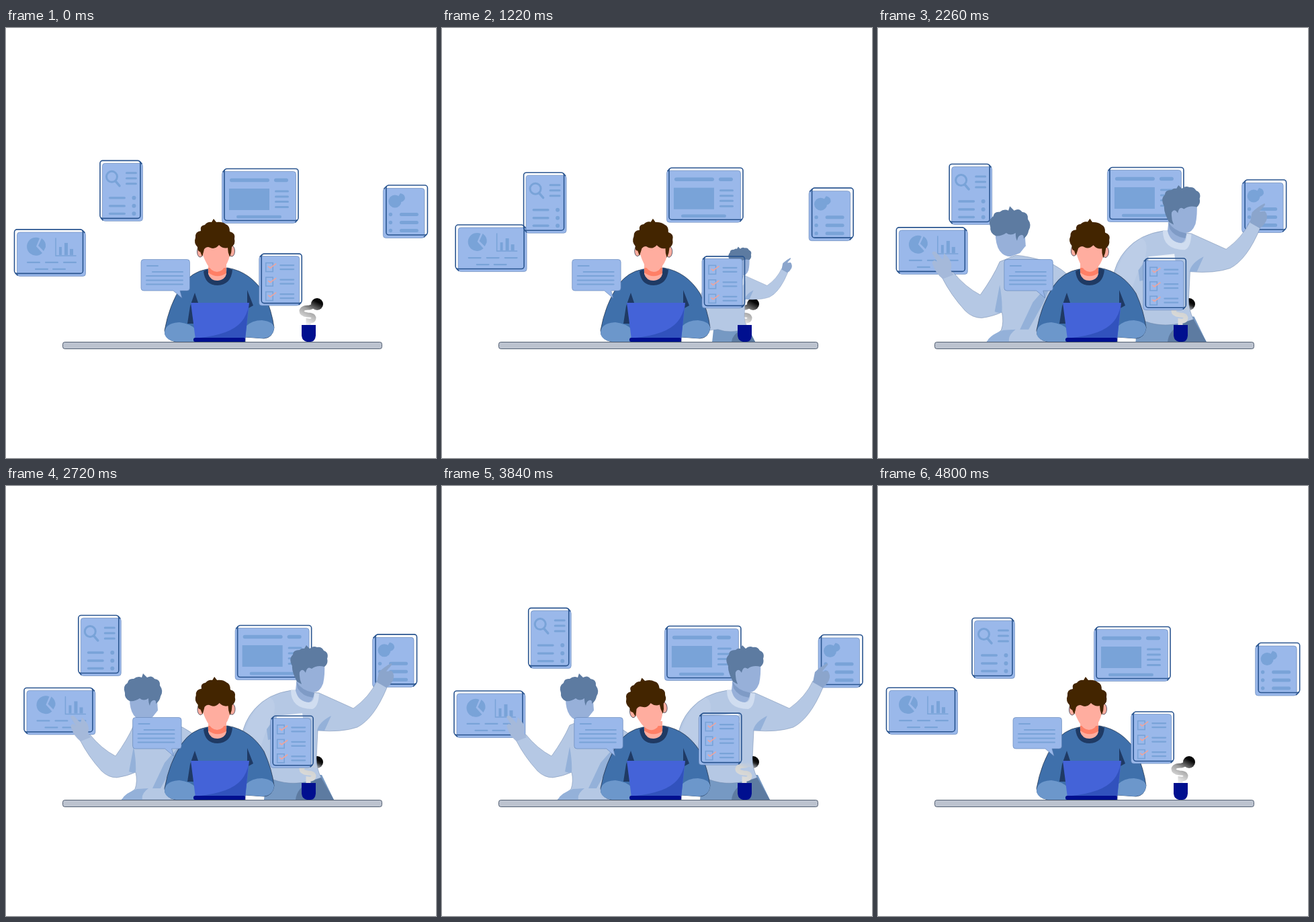
Recreate the animation shown at these times as an HTML page. Size 640 by 640 pixels, loop 4840 ms.

```html
<!DOCTYPE html>
<html lang="en">
<head>
<meta charset="utf-8">
<title>Multitasking at the desk</title>
<style>
  html, body { margin: 0; height: 100%; overflow: hidden; background: #fff; }
  svg { display: block; width: 100vw; height: 100vh; }
  .fill { fill: #9ab8ea; stroke: #5f80b3; stroke-width: .6; }
  .frame { fill: none; stroke: #2a5590; stroke-width: 1.6; }
  .ink { fill: #79a3d8; }
  .line { fill: none; stroke: #79a3d8; stroke-linecap: round; }
  .edge { stroke: #1c2c44; stroke-width: .7; }
  .tick { fill: none; stroke: #eda59f; stroke-width: 1.7; }
  .g-body { fill: #b5c8e4; stroke: #6f86aa; stroke-width: .5; }
  .g-hair { fill: #5d7ba1; }
  .g-skin { fill: #97b0d9; }
  .g-fold { fill: #94b1d9; }
</style>
</head>
<body>
<svg viewBox="0 0 640 640">
  <defs>
    <linearGradient id="dark" gradientUnits="userSpaceOnUse" x1="449" y1="441" x2="466" y2="409">
      <stop offset="0" stop-color="#eee"/><stop offset=".55" stop-color="#a0a0a0"/><stop offset="1" stop-color="#080808"/>
    </linearGradient>
    <linearGradient id="pale" gradientUnits="userSpaceOnUse" x1="449" y1="441" x2="462" y2="411">
      <stop offset="0" stop-color="#dededc"/><stop offset=".6" stop-color="#d2d3d2"/><stop offset="1" stop-color="#b5c8e4" stop-opacity="0"/>
    </linearGradient>
    <g id="steam">
      <path d="M450 443V436Q458 437 458 431Q457 427 449 427Q440 426 440 421Q441 416 452 416L460 413" fill="none" stroke-width="7"/>
      <circle cx="463" cy="411" r="9" stroke="none"/>
    </g>
  </defs>

  <g id="panels"></g>
  <use href="#steam" fill="url(#dark)" stroke="url(#dark)"/>

  <g id="leftGhost">
    <path class="g-body" d="M190 356Q181 377 163 402Q142 391 125 370L110 378Q122 402 142 424Q152 434 165 434Q180 432 193 426Q196 440 192 451L172 467H300V390Q276 362 252 355Q228 348 212 347Z"/>
    <path class="g-fold" d="M190 388L183 425Q189 428 193 426Q194 410 190 388ZM172 467Q177 457 195 451L212 450Q201 458 203 467ZM264 380L236 412L218 450H230L250 414Z"/>
    <path class="g-skin" d="M184 316Q184 332 190 341Q196 349 205 349L218 344L226 334L224 305H190Z"/>
    <path class="g-hair" d="M184 320Q176 316 177 308Q173 298 181 293Q182 286 190 287Q196 282 202 285L204 279L210 285Q217 281 221 287Q230 288 229 297Q235 305 230 313Q229 320 223 324Q224 318 219 319Q215 320 214 327Q212 323 212 316Q205 321 199 316Q192 321 184 320Z"/>
    <path fill="#a5b9da" d="M111 380Q101 372 98 362Q94 355 100 354L104 357L96 344Q98 340 102 343L111 353L113 344L119 351Q125 358 122 368L126 374Z"/>
  </g>

  <g id="rightGhost">
    <path fill="#7699c3" d="M388 430H470L488 467H384Z"/>
    <path class="g-hair" d="M468 432L488 467H431Q433 449 453 440Z"/>
    <path class="g-body" d="M425 304Q390 309 370 332Q354 350 350 376L372 440L398 437Q430 449 469 434Q462 420 462 405L464 364Q500 367 523 359Q548 346 567 300L552 290Q541 314 517 331L466 308Z"/>
    <path fill="#bccde7" d="M392 315Q364 332 354 370L374 410Q382 370 398 344Q404 318 392 315Z"/>
    <path class="g-fold" d="M484 342L474 364H463Q466 351 484 342ZM401 345L388 362L390 378L440 366L425 344Z"/>
    <path fill="#eef3fa" d="M403 342L441 338L443 352L402 357Z"/>
    <path fill="#d0ddf0" d="M424 304Q424 332 456 332Q465 329 466 309L459 308Q459 323 450 322Q433 320 431 303Z"/>
    <path class="g-skin" d="M431 304Q435 321 451 322Q458 320 458 307Q467 307 472 294Q475 281 474 263L435 266Z"/>
    <path fill="#7f9bc6" d="M432 291Q440 304 456 307L459 308L457 315Q441 313 434 301Z"/>
    <path class="g-hair" d="M433 291Q425 276 426 268Q420 257 427 251Q427 244 437 244Q440 241 444 242L447 237L452 242Q457 237 463 240Q470 239 473 245Q481 248 478 257Q480 264 474 269Q463 266 455 272Q448 267 446 278Q441 270 437 277Q436 286 440 295Z"/>
    <path fill="#8ba5cc" d="M552 292L555 277Q563 269 573 264Q577 264 569 272L566 276L574 275Q579 281 576 289Q572 297 566 300Z"/>
  </g>

  <g id="man">
    <path class="edge" fill="#3f70ab" d="M299 359Q276 363 262 383Q243 411 236 450Q236 464 253 467H356V460L384 462Q397 461 399 446Q396 422 384 395Q364 363 330 357Z"/>
    <path fill="#1f3a64" d="M281 394L274 414L270 440H282L286 409ZM359 390L368 413L359 418ZM294 362Q296 383 315 383Q335 382 337 360L329 357Q328 375 315 376Q302 375 300 359Z"/>
    <path fill="#ffad9f" d="M301 350V366Q304 376 315 376Q326 375 328 366V350Z"/>
    <path fill="#ff7f66" d="M301 357H328V365Q314 374 301 364Z"/>
    <path fill="#6c97cb" d="M236 453Q237 439 258 438Q275 440 283 449L281 467H253Q236 464 236 453ZM357 444Q366 435 381 435Q399 437 399 447Q397 462 380 462L355 460Z"/>
    <g id="head">
      <g fill="#ffad9f" class="edge">
        <ellipse cx="289" cy="333" rx="4.5" ry="8"/>
        <ellipse cx="336" cy="332" rx="4.5" ry="8"/>
      </g>
      <path fill="#ffad9f" d="M292 318L293 338Q299 354 306 360Q314 366 322 360Q331 350 333 338L335 318Z"/>
      <path fill="#432500" d="M292 340L289 333Q285 333 285 326Q279 320 282 312Q281 303 290 302Q288 294 296 293Q300 288 306 289L309 284L313 289Q322 288 327 292Q333 294 333 303Q342 305 340 314Q342 321 336 326Q336 334 333 341Q330 334 330 327Q323 329 317 323Q311 330 304 327Q299 324 295 329Q294 334 292 340Z"/>
    </g>
    <path fill="#4463d8" d="M275 409H362L356 463H282Z"/>
    <path fill="#3152bd" d="M361 413Q357 442 326 453Q309 459 288 461L356 463Z"/>
    <rect x="279" y="461" width="77" height="6" rx="2.5" fill="#000f8f"/>
  </g>

  <rect class="edge" x="84.5" y="467.5" width="475" height="10" rx="3" fill="#bcc3cf"/>
  <use id="paleSteam" href="#steam" fill="url(#pale)" stroke="url(#pale)"/>
  <path fill="#000f8f" d="M440 442H461V458Q460 467 453 467H448Q441 466 440 458Z"/>
  <g id="front"></g>
</svg>

<script>
const LOOP = 4840;
const $ = id => document.getElementById(id);
const line = (x1, x2, y, w) => `<path class="line" stroke-width="${w}" d="M${x1 + w / 2} ${y}H${x2 - w / 2}"/>`;
const dot = (x, y, r) => `<circle class="ink" cx="${x}" cy="${y}" r="${r}"/>`;
const bar = (x, y, w, h) => `<rect class="ink" x="${x}" y="${y}" width="${w}" height="${h}"/>`;
const rows = (ys, draw) => ys.map(draw).join('');

// A filled card with an offset frame and two short edges joining them.
function panel(id, x, y, w, h, dx, dy, content) {
  const corners = dx < 0 ? [[x + w - 1, y + 1], [x + 1, y + h - 1]] : [[x + 1, y + 1], [x + w - 1, y + h - 1]];
  const joins = corners.map(([cx, cy]) => `M${cx} ${cy}l${dx} ${dy}`).join('');
  return `<g id="${id}">
    <rect class="fill" x="${x}" y="${y}" width="${w}" height="${h}" rx="4"/>${content}
    <rect class="frame" x="${x + dx}" y="${y + dy}" width="${w}" height="${h}" rx="4"/>
    <path class="frame" d="${joins}"/></g>`;
}

$('panels').innerHTML =
  panel('charts', 16.5, 304, 102, 65.5, -4, -4,
    `<path class="ink" d="M45 325L50 313A13.5 13.5 0 1 0 54 335ZM48 324L53 313Q60 318 59 326L56 332Z"/>
     <path class="line" stroke-width="1.5" d="M74 313V339H104"/>` +
    bar(79, 326, 4, 12) + bar(87, 320, 5, 18) + bar(95, 329, 5, 9) +
    line(31, 51, 349, 2.2) + line(58, 78, 349, 2.2) + line(85, 105, 349, 2.2) +
    line(43, 63, 359, 2.2) + line(69, 89, 359, 2.2)) +
  panel('search', 143.5, 202.5, 60, 86, -3.5, -4,
    `<circle class="line" cx="157.5" cy="222.5" r="8" stroke-width="3"/>
     <path class="line" stroke-width="3.5" d="M163 229L169 236"/>` +
    rows([217, 225, 233], y => line(178, 195, y, 3)) +
    rows([254, 266, 277.5], y => line(153, 178, y, 3.4) + dot(190.5, y, 3))) +
  panel('page', 321.5, 213.5, 110, 77, 3.5, -4,
    line(333, 392, 226.5, 5.5) + line(399, 420, 226.5, 5.5) + bar(332, 239, 60, 32) +
    rows([243, 251, 258.5, 266.5], y => line(400, 421, y, 3)) + line(343, 410, 281, 4.5)) +
  panel('report', 561.5, 237.5, 61.5, 74, 4.5, -4.5,
    dot(579, 257, 9.5) + '<path class="ink" d="M582 253L587 245Q594 246 594 253Q592 258 587 258Z"/>' +
    rows([276.5, 288.5, 300.5], y => dot(572.5, y, 2.7) + line(586, 614, y, 5)));

$('front').innerHTML =
  `<g id="bubble"><path class="fill" d="M205 344.5H269.5Q273.5 344.5 273.5 348.5V387Q273.5 391 269.5 391H259L262 402L249 391H205Q201 391 201 387V348.5Q201 344.5 205 344.5Z"/>` +
  line(209, 227, 354, 2) + line(217, 264, 363, 2) + rows([369, 375.5, 381.5], y => line(208, 264, y, 2)) + '</g>' +
  panel('list', 376.5, 339.5, 60, 73.5, 3.5, -3.5,
    rows([349.5, 371, 392.5], y =>
      `<rect class="line" x="386.5" y="${y}" width="10.5" height="13" stroke-width="1.6"/>
       <path class="tick" d="M390 ${y + 5}L393 ${y + 7.5}L402 ${y + 1}"/>` +
      line(407, 429, y + 3.5, 2.3) + line(407, 429, y + 9.5, 2.3)));

const clamp = v => Math.min(1, Math.max(0, v));
const move = (id, x, y) => $(id).setAttribute('transform', `translate(${x.toFixed(2)} ${y.toFixed(2)})`);

// Piecewise cosine easing through [time, value] pairs.
function ease(keys, t) {
  const i = keys.findIndex(k => k[0] > t);
  const [t0, a] = keys[i - 1], [t1, b] = keys[i];
  return a + (b - a) * (1 - Math.cos(Math.PI * (t - t0) / (t1 - t0))) / 2;
}

// Back-out growth followed by an accelerating shrink.
function pop(t, start, length) {
  const u = 1 - clamp((t - start) / length);
  const leave = clamp((t - 4100) / 550);
  return Math.max(0, (1 - 3 * u ** 3 + 2 * u * u) * (1 - leave ** 3));
}

function grow(id, x, scale) {
  $(id).setAttribute('transform', `translate(${x} 467) scale(${scale}) translate(${-x} -467)`);
  $(id).style.display = scale > 0.01 ? '' : 'none';
}

const tilt = [[0, 0], [700, 0], [1750, 6.5], [3000, 0], [3180, 0], [3900, -7.7], [LOOP, 0]];

function draw(now) {
  const t = now % LOOP, a = t / LOOP * 2 * Math.PI;
  const { sin, cos } = Math;
  const swing = (1 - cos(a)) / 2 + .07 * (1 - cos(2 * a));
  const lean = 1.03 - 1.01 * cos(a + .12);

  move('charts', 7.5 * (1 - cos(a)), -1 - 6 * sin(a - .15));
  move('search', 17 * (cos(a + .07) - 1), 17 * sin(a - .05) - .3);
  move('page', 20 * swing, -2 * swing);
  move('report', 11 * cos(a + .55) - 9.5, 10.5 * sin(a + .5) - 4);
  move('bubble', 6.6 * (cos(a + .1) - 1), 0);
  move('list', 9 * lean, 3.3 * lean);
  $('head').setAttribute('transform', `rotate(${ease(tilt, t)} 315 372)`);

  const right = pop(t, 1010, 1370);
  grow('rightGhost', 431, right);
  grow('leftGhost', 310, pop(t, 1584, 890));
  $('paleSteam').style.display = right > .8 ? '' : 'none';
  requestAnimationFrame(draw);
}
requestAnimationFrame(draw);
</script>
</body>
</html>
```
